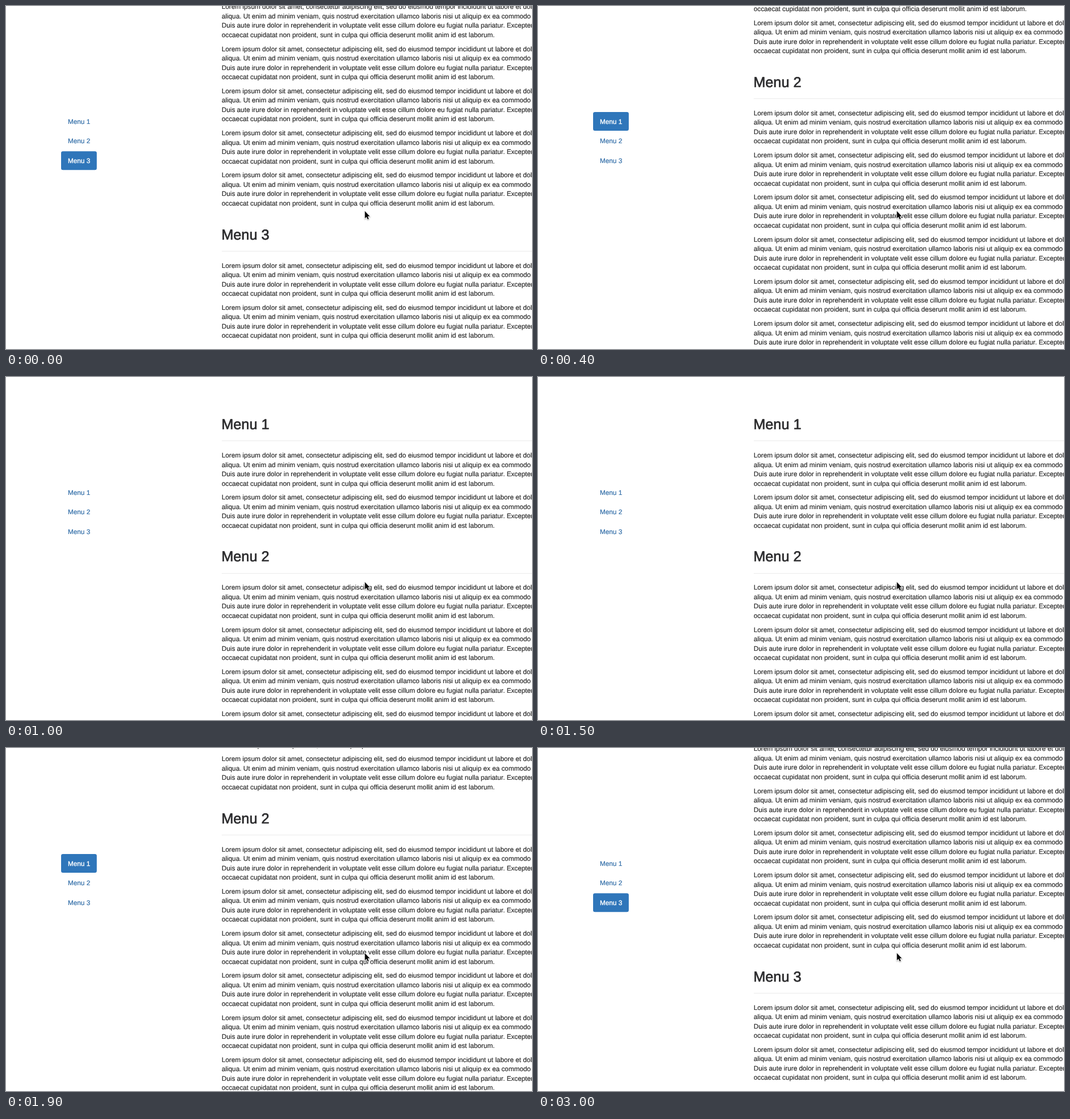
Write an HTML page with a canvas that moves like this. It is 926 by 605 pixels and loops after 3.1 s.

```html
<!DOCTYPE html>
<html lang="en">
<head>
<meta charset="utf-8">
<title>Scroll menu</title>
<style>
  html, body { margin: 0; width: 100%; height: 100%; overflow: hidden; background: #fff; }
  canvas { display: block; }
</style>
</head>
<body>
<canvas id="stage" width="926" height="605"></canvas>
<script>
const WIDTH = 926, HEIGHT = 605;
const LOOP = 3100, STEP = 100;
const FAMILY = '"Liberation Sans", Arial, sans-serif';
const BODY_FONT = `11.75px ${FAMILY}`;
const TITLE_FONT = `25.3px ${FAMILY}`;

const LEFT = 379.8;
const LINE = 16.5, PARAGRAPH = 74.25;
const RULE_GAP = 29.3, TEXT_GAP = 54.9, SECTION_BASE = 84.97;
const PARAGRAPHS = [2, 6, 2];
const ACTIVE_LIMIT = 24;

const LOREM = [
  'Lorem ipsum dolor sit amet, consectetur adipiscing elit, sed do eiusmod tempor incididunt ut labore et dolore magna',
  'aliqua. Ut enim ad minim veniam, quis nostrud exercitation ullamco laboris nisi ut aliquip ex ea commodo consequat.',
  'Duis aute irure dolor in reprehenderit in voluptate velit esse cillum dolore eu fugiat nulla pariatur. Excepteur sint',
  'occaecat cupidatat non proident, sunt in culpa qui officia deserunt mollit anim id est laborum.'
];

// Height of the first title on screen, one entry per step of each scroll.
const TOP = 82.9, BOTTOM = -361.4;
const SCROLL_UP = [BOTTOM, -343, -272, -182, -99.7, -34, 13, 35.8, 55, 71];
const SCROLL_DOWN = [79.5, 13, -110, -255];
const DOWN_START = 17;

const ctx = document.getElementById('stage').getContext('2d');
ctx.textRendering = 'geometricPrecision';

function scrollAt(step) {
  if (step < SCROLL_UP.length) return SCROLL_UP[step];
  if (step < DOWN_START) return TOP;
  return SCROLL_DOWN[step - DOWN_START] ?? BOTTOM;
}

function drawText(text, x, y, font, color, weight) {
  ctx.font = font;
  ctx.fillStyle = ctx.strokeStyle = color;
  ctx.fillText(text, x, y);
  if (weight) {
    ctx.lineWidth = weight;
    ctx.strokeText(text, x, y);
  }
}

function drawSection(index, y) {
  drawText(`Menu ${index + 1}`, LEFT - 0.6, y + 9.1, TITLE_FONT, '#2b2b2d', 0.7);
  ctx.fillStyle = '#ebebeb';
  ctx.fillRect(LEFT, Math.round(y + RULE_GAP), WIDTH, 1);
  for (let p = 0; p < PARAGRAPHS[index]; p++) {
    LOREM.forEach((text, row) => {
      const baseline = y + TEXT_GAP + p * PARAGRAPH + row * LINE + 4.2;
      if (baseline > -5 && baseline < HEIGHT + 12) {
        drawText(text, LEFT, baseline, BODY_FONT, '#222', 0.15);
      }
    });
  }
}

function drawMenu(active) {
  for (let i = 0; i < 3; i++) {
    const y = 203.5 + i * 34.65;
    if (i === active) {
      ctx.fillStyle = '#2f76ba';
      ctx.beginPath();
      ctx.roundRect(97, y - 16.5, 62.8, 33, 3.3);
      ctx.fill();
    }
    drawText(`Menu ${i + 1}`, 109, y + 4.3, BODY_FONT,
      i === active ? '#fff' : '#2e6ba6', i === active ? 0.4 : 0.2);
  }
}

function drawCursor() {
  const arrow = new Path2D('M631.8 361.8V374.6L634.7 371.9L636.7 376.3L638.7 375.4L636.8 371.1L640.4 370.9Z');
  ctx.save();
  ctx.shadowColor = 'rgba(0,0,0,.35)';
  ctx.shadowBlur = 2;
  ctx.shadowOffsetY = 1;
  ctx.strokeStyle = '#fff';
  ctx.lineWidth = 1.6;
  ctx.stroke(arrow);
  ctx.restore();
  ctx.fillStyle = '#080808';
  ctx.fill(arrow);
}

function draw(time) {
  const first = scrollAt(Math.floor((time % LOOP) / STEP));
  ctx.fillStyle = '#fff';
  ctx.fillRect(0, 0, WIDTH, HEIGHT);

  let y = first, active = -1;
  PARAGRAPHS.forEach((count, i) => {
    drawSection(i, y);
    if (y <= ACTIVE_LIMIT) active = i;
    y += SECTION_BASE + count * PARAGRAPH;
  });
  if (first === BOTTOM) active = 2;

  drawMenu(active);
  drawCursor();
}

const start = performance.now();
function tick() {
  draw(performance.now() - start);
  requestAnimationFrame(tick);
}
tick();
</script>
</body>
</html>
```
